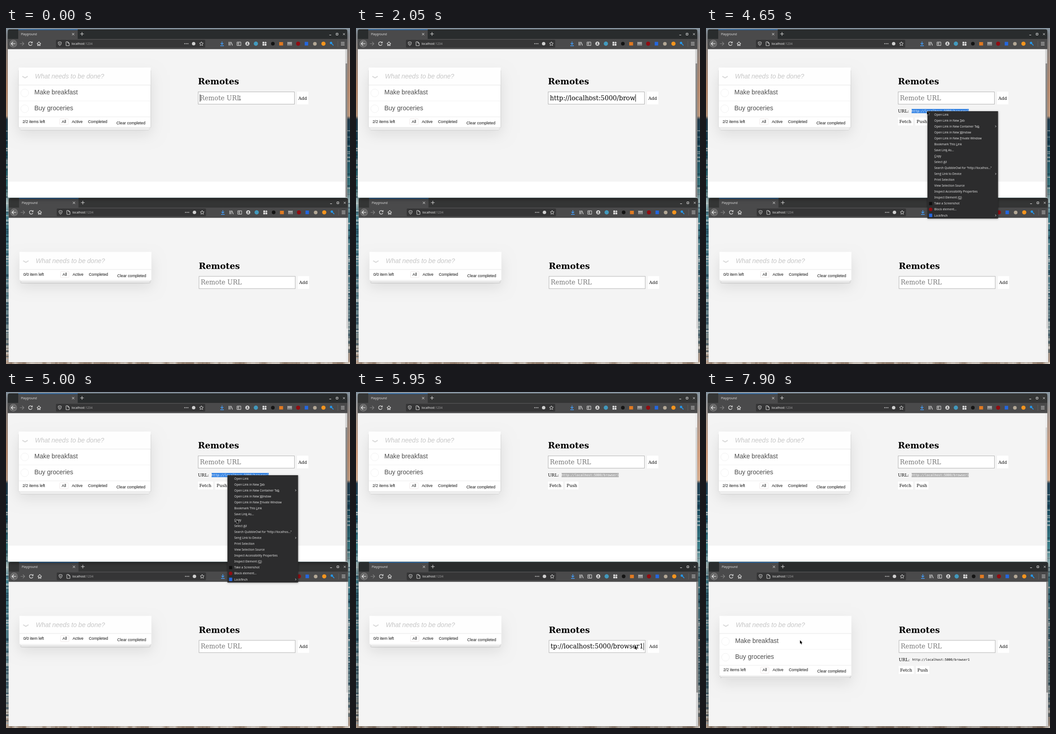
Write an HTML page with a canvas that moves like this. It is 758 by 739 pixels and loops after 8 s.

```html
<!DOCTYPE html>
<html lang="en">
<head>
<meta charset="utf-8">
<title>Playground</title>
<style>
html, body { margin: 0; width: 100%; height: 100%; overflow: hidden; }
canvas { display: block; }
</style>
</head>
<body>
<canvas id="stage" width="758" height="739"></canvas>
<script>
const ctx = document.getElementById('stage').getContext('2d');
const LOOP = 8000, STEP = 50;
const URL_TEXT = 'http://localhost:5000/browser1';
const SERIF = '"DejaVu Serif", serif';
const SANS = '"Liberation Sans", Arial, sans-serif';
const UI = '"Noto Sans", sans-serif';
const MONO = '7px "DejaVu Sans Mono", monospace';

// [start, end, first count, last count] for each burst of keys
const typing = [
  [250, 450, 1, 4], [600, 1250, 5, 16], [1550, 1550, 19, 19], [1650, 1650, 21, 21],
  [1800, 1850, 22, 23], [2000, 2050, 25, 26], [2200, 2400, 27, 30]
];

// [time, x, y] of the pointer's hot spot
const pointerPath = [
  [0, 515, 154], [2600, 515, 154], [2850, 663, 155], [3000, 663, 156], [3200, 560, 222],
  [3400, 458, 204], [3500, 458, 204], [3550, 467, 207], [3950, 467, 207], [4150, 484, 187],
  [4300, 484, 187], [4350, 487, 183], [4700, 487, 183], [4900, 508, 281], [5050, 508, 281],
  [5300, 512, 538], [5350, 512, 538], [5450, 512, 553], [5700, 512, 553], [6050, 655, 560],
  [6250, 655, 560], [6600, 441, 610], [7200, 441, 610], [7700, 240, 538], [7900, 207, 546]
];

// "&" marks the underlined access key
const menuItems = [
  'Open Link', 'Open Link in New &Tab', 'Open Link in New Container Ta&b', 'Open Link in New &Window',
  'Open Link in New &Private Window', 'Bookmark This &Link', 'Save Lin&k As…', '&Copy', 'Select &All',
  'Search QuibbleOwl for “http://localhos…”', 'Sen&d Link to Device', 'Print Selection',
  'View Selection Source', 'Inspect Accessibility Properties', 'Inspect Element (&Q)',
  'Take a Screenshot', 'Block element…', 'Lockfinch'
];

function rect(x, y, w, h, color) {
  ctx.fillStyle = color;
  ctx.fillRect(x, y, w, h);
}
function dot(x, y, r, color) {
  ctx.fillStyle = color;
  ctx.beginPath();
  ctx.arc(x, y, r, 0, 7);
  ctx.fill();
}
function pen(path, color = '#dcdcdc', width = 1) {
  ctx.strokeStyle = color;
  ctx.lineWidth = width;
  ctx.stroke(new Path2D(path));
}
function text(str, x, y, font, color = '#000') {
  ctx.font = font;
  ctx.fillStyle = color;
  ctx.fillText(str, x, y);
}
function withShadow(color, blur, dy, draw) {
  ctx.save();
  ctx.shadowColor = color;
  ctx.shadowBlur = blur;
  ctx.shadowOffsetY = dy;
  draw();
  ctx.restore();
}

function drawWallpaper() {
  const g = ctx.createLinearGradient(0, 0, 0, 739);
  [[0, '#8997a3'], [.08, '#b3a298'], [.18, '#dba583'], [.262, '#e0b595'], [.272, '#28465a'], [.36, '#1d5266'],
   [.46, '#3d8590'], [.52, '#a9bcbd'], [.56, '#3f7c8a'], [.75, '#557f8b'], [.9, '#7d9194'], [.99, '#b39c8b'],
   [1, '#cbb9a8']].forEach(([at, color]) => g.addColorStop(at, color));
  rect(0, 0, 758, 739, g);
  let seed = 7;
  const random = () => (seed = seed * 16807 % 2147483647) / 2147483647;
  for (let i = 0; i < 200; i++) {
    const y = 225 + random() * 505, x = random() < .5 ? 0 : 751;
    rect(x, y, 7, 1 + random() * 3, random() < .5 ? 'rgba(232,230,226,.55)' : 'rgba(20,55,75,.55)');
  }
  for (let x = 0; x < 758; x += 9) {
    rect(x, 735, 4 + random() * 16, 4, random() < .5 ? 'rgba(235,228,220,.5)' : 'rgba(130,105,85,.3)');
  }
}

function drawChrome(focused) {
  ctx.fillStyle = focused ? '#292c2d' : '#343535';
  ctx.beginPath();
  ctx.roundRect(4, 3, 748, 22, [4, 4, 0, 0]);
  ctx.fill();
  rect(27, 3, 131, 22, '#4a4a4b');
  rect(27, 3, 131, 1.3, '#1765b5');
  rect(4, 24, 748, 22.5, '#4a4a4b');
  text('Playground', 33, 16, '6.5px ' + UI, '#dedede');
  pen('M145.5 11l5 5m0-5l-5 5M163.5 13h8m-4-4v8', '#e4e4e4');
  pen('M712.5 15.5h4M727.5 11.5h4v4h-4zM742.7 11.5l4 4m0-4l-4 4', '#eee');

  dot(16, 34.5, 8.2, '#8a8a8a');
  dot(16, 34.5, 7.5, '#676767');
  pen('M20.5 34.5h-9m4-4l-4 4 4 4', '#eee', 1.2);
  pen('M30.5 34.5h9m-4-4l4 4-4 4', '#868686', 1.2);
  pen('M57 32a4 4 0 1 0 .6 3.6M58 29.8v3.2h-3.2', '#e4e4e4', 1.2);
  pen('M68 34.8l4.5-4.4 4.5 4.4M69.7 34v4.8h1.8v-2.8h2v2.8h1.8V34', '#e4e4e4', 1.1);

  ctx.fillStyle = '#353536';
  ctx.beginPath();
  ctx.roundRect(110, 26, 329, 17, 2);
  ctx.fill();
  pen('M118.5 30.3l3.4 1c0 4-1 6-3.4 7.4-2.4-1.4-3.4-3.4-3.4-7.4zM118.5 32.5v4');
  pen('M132.3 30.3h4l3 3v5.6h-7zM136.3 30.3v3h3');
  text('localhost', 144.5, 37, '6.8px ' + UI, '#eee');
  const hostWidth = ctx.measureText('localhost').width;
  text(':1234', 144.5 + hostWidth, 37, '6.8px ' + UI, '#a0a0a0');
  [393.8, 397.3, 400.8].forEach(x => dot(x, 34.5, 1.1, '#ddd'));
  dot(413.5, 34.5, 3.8, '#cfcfcf');
  pen('M430.5 30.2l1.3 2.8 3 .4-2.2 2.1.6 3-2.7-1.5-2.7 1.5.6-3-2.2-2.1 3-.4z');

  pen('M476 29.8v6.4m-3-3l3 3 3-3M472.2 39h7.8', '#45a1ff', 1.3);
  pen('M491.3 30.5v8M494 30.5v8M496 30.8l3 7.7', '#ddd', 1.3);
  pen('M509 31h8.5v7.5H509zM513 31v7.5M510.2 33.3h1.6m-1.6 2h1.6', '#e2e2e2');
  dot(532, 34.5, 4.5, '#e2e2e2');
  dot(532, 33.3, 1.5, '#4a4a4b');
  rect(529.7, 35.6, 4.6, 1.5, '#4a4a4b');
  dot(550.6, 34.5, 4.7, '#4299bd');
  [[565.3, 30.4], [565.3, 35], [570, 35]].forEach(([x, y]) => rect(x, y, 3.8, 3.8, '#e2e2e2'));
  pen('M572 30.2v4.4m-2.2-2.2h4.4', '#e2e2e2', 1.8);
  dot(588, 34.5, 4, '#141414');
  rect(602, 31, 8.5, 7.5, '#e07a22');
  pen('M621 30.5v8m2.7-8v8m2.7-8v8m2.7-8v8M620.3 33h9.5', '#e2e2e2', 1.1);
  dot(643.7, 34.5, 4.5, '#900d12');
  rect(658.2, 30.5, 7.6, 8, '#2467df');
  dot(680.6, 34.7, 4, '#b3a795');
  dot(699.5, 34.5, 4.6, '#f3941e');
  dot(716.2, 32.8, 2.6, '#2497ed');
  pen('M717.5 34l4 4.3', '#2497ed', 1.8);
  rect(730.8, 28, .7, 13, '#6a6a6a');
  pen('M738 31.5h8M738 34.5h8M738 37.5h8', '#e4e4e4', 1.1);
}

function drawCard(full) {
  const left = 28, top = 87, width = 290.5, foot = full ? 195 : 125.5, bottom = foot + 23.3;
  withShadow('rgba(0,0,0,.1)', 29, 14.6, () => rect(left, top, width, bottom - top, '#fff'));
  [[3.5, 5.8], [1.75, 2.9], [0, 0]].forEach(([inset, drop]) =>
    withShadow('rgba(0,0,0,.25)', 1.6, .6, () =>
      rect(left + inset, top + 5, width - 2 * inset, bottom + drop - top - 5, inset ? '#f6f6f6' : '#fff')));
  rect(left, top, width, 38, '#fefefe');
  rect(left, 125, width, .8, '#dedede');
  pen('M36 106.2l6 3.6 6-3.6', '#dadada', 2.2);
  text('What needs to be done?', 63.7, 111, 'italic 14px ' + SANS, '#c6c6c6');
  if (full) {
    ['Make breakfast', 'Buy groceries'].forEach((label, i) => {
      const y = 146 + i * 34.8;
      ctx.strokeStyle = '#ececec';
      ctx.lineWidth = .8;
      ctx.beginPath();
      ctx.arc(41.2, y - 3.2, 8.6, 0, 7);
      ctx.stroke();
      text(label, 62.5, y, '14px ' + SANS, '#4d4d4d');
      rect(left, 160 + i * 35, width, .7, i ? '#e2e2e2' : '#ededed');
    });
  }
  const font = '8.75px ' + SANS, y = foot + 13.7;
  text(full ? '2/2 items left' : '0/0 item left', 36.4, y, font, '#111');
  text('All', 122.8, y, font, '#111');
  text('Active', 145, y, font, '#111');
  text('Completed', 180.8, y, font, '#111');
  text('Clear completed', 243.3, y + 3, font, '#111');
  ctx.strokeStyle = '#ebe2e2';
  ctx.lineWidth = .8;
  ctx.beginPath();
  ctx.roundRect(118.5, foot + 4.3, 18.5, 13.5, 1.8);
  ctx.stroke();
}

function button(label, x, y, w, h, active) {
  rect(x, y, w, h, active ? '#808080' : '#fff');
  text(label, x + 3, y + h / 2 + 3.5, '9.33px ' + SERIF);
}

function drawRemotes(s) {
  text('Remotes', 423, 124, 'bold 18.67px ' + SERIF);
  rect(423, 140, 213, 28, '#b2b2b2');
  rect(424, 141, 211, 26, '#fff');
  ctx.save();
  ctx.beginPath();
  ctx.rect(427, 141, 206, 26);
  ctx.clip();
  ctx.font = '14px ' + SERIF;
  const typedWidth = ctx.measureText(s.typed).width;
  const scroll = Math.max(0, typedWidth - 204.5);
  text(s.typed || 'Remote URL', 427.2 - scroll, 158.7, '14px ' + SERIF, s.typed ? '#000' : '#777');
  if (s.caret) rect(427.2 + typedWidth - scroll, 146, 1, 16, '#000');
  ctx.restore();
  button('Add', 641.3, 140, 25, 28, s.press === 'Add');
  if (!s.added) return;
  text('URL:', 423, 186, '9.33px ' + SERIF);
  if (s.selection) rect(453, 178, 126, 9.3, s.selection);
  text(URL_TEXT, 452.8, 185, MONO, s.selection ? '#fff' : '#000');
  button('Fetch', 423, 197, 33, 17.3, s.press === 'Fetch');
  button('Push', 461.1, 197, 29, 17.3, s.press === 'Push');
}

function drawWindow(s) {
  ctx.save();
  ctx.translate(s.x, s.y);
  withShadow(s.focused ? 'rgba(0,0,0,.6)' : 'rgba(0,0,0,.3)', s.focused ? 10 : 5, 1,
    () => rect(4, 7, 748, s.bottom - 7, '#f4f4f4'));
  if (s.pageEnd < s.bottom) rect(4, s.pageEnd, 748, s.bottom - s.pageEnd, '#fff');
  rect(747.5, 46, 4.5, s.bottom - 46, s.focused ? '#d2d2d2' : '#ededed');
  rect(748.5, s.thumb[0], 3, s.thumb[1] - s.thumb[0], s.focused ? '#7d7d7d' : '#d0d0d0');
  drawChrome(s.focused);
  ctx.beginPath();
  ctx.rect(4, 46.5, 743, s.bottom - 46.5);
  ctx.clip();
  ctx.translate(0, s.scroll);
  drawCard(s.full);
  drawRemotes(s);
  ctx.restore();
}

function drawMenu() {
  withShadow('rgba(0,0,0,.4)', 4, 1, () => rect(488, 183, 155.5, 236, '#2c2c2d'));
  const font = '6.6px ' + UI, color = '#e2e2e2';
  menuItems.forEach((item, i) => {
    const y = 192.5 + i * 13.06, [before, after] = item.split('&');
    text(before + (after || ''), 503, y, font, color);
    if (after) rect(503 + ctx.measureText(before).width, y + .8, ctx.measureText(after[0]).width, .6, color);
    if ([2, 10, 17].includes(i)) pen(`M637.3 ${y - 4.2}l1.9 1.9-1.9 1.9`, color, .9);
  });
  rect(491.5, 382.7, 7, 7, '#101010');
  dot(495, 399, 3.9, '#900d12');
  rect(491.5, 408.3, 7, 7.5, '#2467df');
}

function drawPointer(t) {
  const i = pointerPath.findLastIndex(p => p[0] <= t);
  const [t0, x0, y0] = pointerPath[i], [t1, x1, y1] = pointerPath[i + 1] || [LOOP, x0, y0];
  const k = (t - t0) / (t1 - t0), x = x0 + (x1 - x0) * k, y = y0 + (y1 - y0) * k;
  ctx.save();
  ctx.translate(x, y);
  if (t < 2700 || (t >= 4350 && t < 4500)) {
    pen('M-1.5 -4h3M0 -4v8M-1.5 4h3', '#444', .9);
  } else {
    const arrow = new Path2D('M0 0v7.6l1.8-1.6 1.3 2.9 1.4-.6-1.3-2.8h2.4z');
    ctx.strokeStyle = 'rgba(255,255,255,.8)';
    ctx.lineWidth = 1;
    ctx.stroke(arrow);
    ctx.fillStyle = '#000';
    ctx.fill(arrow);
  }
  ctx.restore();
}

function typedCount(t) {
  const burst = typing.findLast(b => b[0] <= t);
  if (!burst) return 0;
  const [start, end, first, last] = burst;
  return t >= end ? last : Math.round(first + (last - first) * (t - start) / (end - start));
}

function render(t) {
  const between = (a, b) => t >= a && t < b;
  const lowerFocus = t >= 5350;
  drawWallpaper();
  const upper = {
    x: 0, y: 0, bottom: 373, pageEnd: 338, scroll: 0, thumb: [78, 372], focused: !lowerFocus, full: true,
    typed: t < 2950 ? URL_TEXT.slice(0, typedCount(t)) : '', caret: t < 2950, added: t >= 2950,
    press: between(3900, 3950) ? 'Push' : '',
    selection: t < 4500 ? '' : lowerFocus ? '#b0b0b0' : '#3584e4'
  };
  const lower = {
    x: 1.75, y: 371, bottom: 364, pageEnd: 364, scroll: 34.7, thumb: [47, 290], focused: lowerFocus, full: t >= 6950,
    typed: between(5600, 6250) ? URL_TEXT : '', caret: between(5350, 6150), added: t >= 6250,
    press: between(6150, 6250) ? 'Add' : between(6800, 6900) ? 'Fetch' : ''
  };
  (lowerFocus ? [upper, lower] : [lower, upper]).forEach(drawWindow);
  if (between(4600, 5050)) drawMenu();
  drawPointer(t);
}

function tick() {
  const t = performance.now() % LOOP;
  render(Math.floor(t / STEP) * STEP);
  requestAnimationFrame(tick);
}
tick();
</script>
</body>
</html>
```
